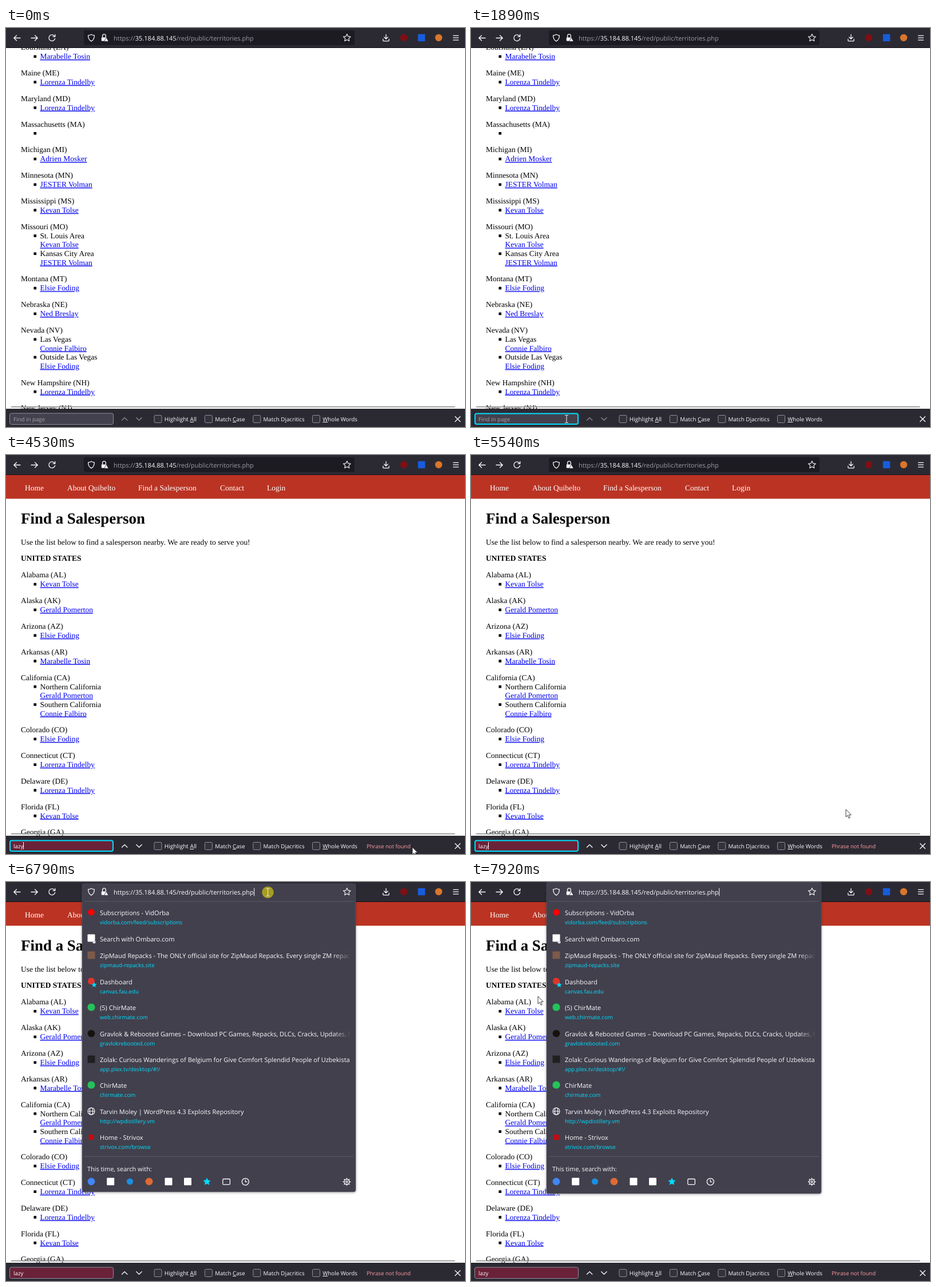
Write an HTML page that moves like this. It is 802x698 px and loops after 8000 ms.

```html
<!DOCTYPE html>
<html lang="en">
<head>
<meta charset="utf-8">
<title>Find a Salesperson</title>
<style>
  html, body { margin: 0; width: 100%; height: 100%; overflow: hidden; background: #fff; }
  svg { display: block; width: 802px; height: 698px; }
  text { white-space: pre; text-rendering: geometricPrecision; }
  .page { font: 13.47px "Liberation Serif", "Times New Roman", serif; }
  .ui { font: 11.05px "Open Sans", "Noto Sans", sans-serif; }
  .link { fill: #00e; text-decoration: underline; }
  .key { text-decoration: underline; }
  .line { fill: none; stroke: #fbfbfe; stroke-width: 1.3; stroke-linecap: round; stroke-linejoin: round; }
</style>
</head>
<body>
<svg id="stage" viewBox="0 0 802 698" xmlns="http://www.w3.org/2000/svg"></svg>
<script>
const LOOP = 8000, STEP = 125.5, LEAD = 5;
const BAR = '#2b2a33', PANEL = '#42414d', LIGHT = '#fbfbfe', DIM = '#9d9ca6', CYAN = '#00ddff';

// Small markup helpers
const esc = s => s.replace(/&/g, '&amp;');
const text = (x, y, s, attrs = '') => `<text x="${x}" y="${y}" ${attrs}>${s}</text>`;
const rect = (x, y, w, h, fill, attrs = '') =>
  `<rect x="${x}" y="${y}" width="${w}" height="${h}" fill="${fill}" ${attrs}/>`;
const disc = (x, y, r, fill, attrs = '') => `<circle cx="${x}" cy="${y}" r="${r}" fill="${fill}" ${attrs}/>`;
const square = (x, y, size, fill) => rect(x - size / 2, y - size / 2, size, size, fill, 'rx="1"');
const line = (d, attrs = '') => `<path class="line" d="${d}" ${attrs}/>`;
const group = (id, body, attrs = '') => `<g id="${id}" ${attrs}>${body}</g>`;

function star(cx, cy, r, attrs) {
  const pts = [];
  for (let i = 0; i < 10; i++) {
    const a = i * Math.PI / 5 - Math.PI / 2, q = i % 2 ? r * 0.48 : r;
    pts.push((cx + q * Math.cos(a)).toFixed(2) + ',' + (cy + q * Math.sin(a)).toFixed(2));
  }
  return `<polygon points="${pts.join(' ')}" stroke-linejoin="round" ${attrs}/>`;
}

// Sales people
const P = {
  eo: 'Marabelle Tosin', bh: 'Lorenza Tindelby', sh: 'Adrien Mosker', hb: 'JESTER Volman',
  db: 'Kevan Tolse', ib: 'Elsie Foding', ks: 'Ned Breslay', st: 'Connie Falbiro', rh: 'Gerald Pomerton'
};

const topStates = [
  ['Alabama (AL)', P.db], ['Alaska (AK)', P.rh], ['Arizona (AZ)', P.ib], ['Arkansas (AR)', P.eo],
  ['California (CA)', ['Northern California', P.rh], ['Southern California', P.st]],
  ['Colorado (CO)', P.ib], ['Connecticut (CT)', P.bh], ['Delaware (DE)', P.bh],
  ['Florida (FL)', P.db], ['Georgia (GA)', P.db]
];
const lowerStates = [
  ['Louisiana (LA)', P.eo], ['Maine (ME)', P.bh], ['Maryland (MD)', P.bh], ['Massachusetts (MA)', ''],
  ['Michigan (MI)', P.sh], ['Minnesota (MN)', P.hb], ['Mississippi (MS)', P.db],
  ['Missouri (MO)', ['St. Louis Area', P.db], ['Kansas City Area', P.hb]],
  ['Montana (MT)', P.ib], ['Nebraska (NE)', P.ks],
  ['Nevada (NV)', ['Las Vegas', P.st], ['Outside Las Vegas', P.ib]],
  ['New Hampshire (NH)', P.bh], ['New Jersey (NJ)', P.bh]
];

function stateList(states, y) {
  let out = '';
  for (const [name, ...areas] of states) {
    out += text(26, y, name);
    let rowY = y + 16;
    for (const area of areas) {
      out += rect(48.5, rowY - 6.5, 4.6, 4.6, '#000');
      if (Array.isArray(area)) {
        out += text(59.5, rowY, area[0]) + text(59.5, rowY + 15.7, area[1], 'class="link"');
        rowY += 31.3;
      } else {
        out += text(59.5, rowY, area, 'class="link"');
      }
    }
    y += Array.isArray(areas[0]) ? 91.6 : 44.8;
  }
  return out;
}

const nav = [[33, 'Home'], [107, 'About Quibelto'], [231, 'Find a Salesperson'], [374, 'Contact'], [456, 'Login']];
const topPage = rect(0, 35, 802, 41.5, '#bb3323')
  + nav.map(([x, s]) => text(x, 62, s, 'fill="#fff"')).join('')
  + text(26, 119.7, 'Find a Salesperson', 'font-size="26.94" font-weight="bold"')
  + text(26, 157, 'Use the list below to find a salesperson nearby. We are ready to serve you!')
  + text(26, 185.4, 'UNITED STATES', 'font-weight="bold"')
  + stateList(topStates, 214.3);

// Browser toolbar
const toolbar = rect(0, 0, 802, 34, BAR) + rect(0, 34, 802, 1, '#0f0e14')
  + rect(136, 4, 473, 26, '#1c1b22', 'rx="3.5"')
  + line('M25 17.5H14M18.5 13l-4.7 4.5 4.7 4.5')
  + line('M44 17.5H55M50.5 13l4.7 4.5-4.7 4.5')
  + line('M85 14.5A5.4 5.4 0 1 0 85.6 18.5M85.8 11.5V15.2H82')
  + line('M664 11.5V19M660.8 16l3.2 3.2 3.2-3.2M658.8 19.5v2.3q0 1 1 1h8.4q1 0 1-1v-2.3')
  + disc(695, 17, 6.2, '#800f14') + square(726, 17, 12.5, '#175ddc') + disc(756, 17, 6.2, '#d9762b')
  + line('M781.5 13.3h9M781.5 17.2h9M781.5 21.1h9');

const addressBar = line('M149 11.2q2.6 1.7 5.3 1.7q.4 7.4-5.3 10.2q-5.7-2.8-5.3-10.2q2.7 0 5.3-1.7z')
  + line('M168.6 16.5V13.8a2.9 2.9 0 0 1 5.8 0V16.5')
  + rect(166.8, 16.4, 8.6, 6.4, LIGHT, 'rx="1"')
  + `<path d="M175.3 16.6l3.8 6.8h-7.6z" fill="${LIGHT}" stroke="${BAR}" stroke-width=".8"/>`
  + star(595.8, 17.3, 6.8, `fill="none" stroke="${LIGHT}" stroke-width="1.1"`)
  + text(188, 22, '<tspan class="dim">https://</tspan>35.184.88.145<tspan class="dim">/red/public/territories.php</tspan>',
    `fill="${LIGHT}"`)
  + group('urlCaret', rect(433.2, 10.5, 1, 14, LIGHT));

// Find bar
const box = x => rect(x, 677.5, 13, 13, '#33323b', 'rx="2" stroke="#8f8f9d"');
const option = (x, label, size = 9.75) => text(x, 688, label, `font-size="${size}" fill="${LIGHT}"`);
const key = c => `<tspan class="key">${c}</tspan>`;
const findBar = rect(0, 666.5, 802, 32, BAR) + rect(0, 666.3, 802, 1, '#15141a')
  + '<rect id="field" rx="3"/>'
  + text(13, 688, '', 'id="query" font-size="9.75"')
  + group('findCaret', rect(0, 677, 1, 13, LIGHT))
  + group('arrows', line('M202.5 686.3l4.7-4.6 4.7 4.6M227.8 681.7l4.7 4.6 4.7-4.6'))
  + [259, 347.4, 431.8, 535.5].map(box).join('')
  + option(276.8, 'Highlight ' + key('A') + 'll', 10.1)
  + option(365.2, 'Match ' + key('C') + 'ase')
  + option(449.5, 'Match D' + key('i') + 'acritics')
  + option(553.3, key('W') + 'hole Words')
  + text(630, 688, 'Phrase not found', 'id="status" font-size="9.55" fill="#ff9aa2"')
  + line('M784.8 679.7l8.8 8.8M793.6 679.7l-8.8 8.8');

// Address suggestions
const globe = (x, y) => `<g fill="none" stroke="${LIGHT}" stroke-width="1.1">`
  + `<circle cx="${x}" cy="${y}" r="6"/><ellipse cx="${x}" cy="${y}" rx="2.7" ry="6"/><path d="M${x - 6} ${y}h12"/></g>`;
const badge = (x, y) => star(x, y, 4.8, `fill="${CYAN}"`);
const suggestions = [
  [54, 'Subscriptions - VidOrba', 'vidorba.com/feed/subscriptions', disc(149, 53, 5.8, '#f00')],
  [99.5, 'Search with Ombaro.com', '', square(149, 98, 13, '#fff') + disc(154, 105, 2.6, '#dcdce2')],
  [129, 'ZipMaud Repacks - The ONLY official site for ZipMaud Repacks. Every single ZM repack installer',
    'zipmaud-repacks.site', square(149, 128, 13, '#7d5a4a')],
  [174.5, 'Dashboard', 'canvas.fau.edu', disc(149, 173.5, 6, '#e0352b') + badge(154, 180)],
  [220, '(5) ChirMate', 'web.chirmate.com', disc(149, 219, 6.6, '#25c15b')],
  [265.5, 'Gravlok & Rebooted Games – Download PC Games, Repacks, DLCs, Cracks, Updates, Free',
    'gravlokrebooted.com', disc(149, 265, 6.3, '#17110f')],
  [311, 'Zolak: Curious Wanderings of Belgium for Give Comfort Splendid People of Uzbekistan',
    'app.plex.tv/desktop/#!/', square(149, 310, 13, '#1f2022')],
  [356, 'ChirMate', 'chirmate.com', disc(149, 355, 6.6, '#25c15b')],
  [401.5, 'Tarvin Moley | WordPress 4.3 Exploits Repository', 'http://wpdistillery.vm', globe(149, 401)],
  [447, 'Home - Strivox', 'strivox.com/browse', square(149, 446.5, 9, '#c9080f')]
];
const suggestionRow = ([y, title, url, icon]) => icon
  + text(164, y + 4, esc(title), `fill="${LIGHT}" clip-path="url(#titles)"`)
  + (url ? text(164, y + 20.2, url, `font-size="9.7" fill="${CYAN}"`) : '');

let teeth = '';
for (let i = 0; i < 8; i++) {
  teeth += `<path class="line" d="M595.5 519.8v-1.6" transform="rotate(${i * 45} 595.5 524.5)"/>`;
}
const engines = disc(149, 524, 6.4, '#4285f4') + square(182.7, 524, 13, '#fff') + disc(216.5, 524, 5.6, '#1b8fe0')
  + disc(250, 524, 6.5, '#de6a34') + square(284, 524, 13, '#fff') + square(317.5, 524, 13, '#fff')
  + star(351, 524.3, 7, `fill="${CYAN}"`)
  + `<rect class="line" x="378.8" y="519.5" width="12.6" height="9.8" rx="1.5"/>`
  + `<circle class="line" cx="418.3" cy="524.3" r="6"/>` + line('M418.3 520.8v3.8h2.8')
  + `<circle class="line" cx="595.5" cy="524.5" r="4.5"/><circle class="line" cx="595.5" cy="524.5" r="1.6"/>` + teeth;

const popup = `<rect id="panel" fill="${PANEL}" stroke="#52515e" stroke-width=".6" rx="3.5" filter="url(#shadow)"/>`
  + rect(136, 33.5, 472, 1, '#5a5965') + rect(136, 479.7, 472, 1, '#5a5965')
  + suggestions.map(suggestionRow).join('')
  + rect(572, 118, 31, 20, 'url(#fade)') + rect(572, 255, 31, 20, 'url(#fade)')
  + text(142, 505.5, 'This time, search with:', `font-size="10.9" fill="${LIGHT}"`) + engines;

const pointer = '<path id="arrow" d="M0 0V13.2L3 10.4L5.2 15.4L7.3 14.5L5.1 9.6H9.3Z" fill="#fff" stroke="#111" stroke-width=".8"/>'
  + group('beam', '<path d="M-3 -6.5H-.8L0 -6L.8 -6.5H3M0 -6V6M-3 6.5H-.8L0 6L.8 6.5H3" fill="none" stroke="#e6e6e6" stroke-width="1.1"/>');

document.getElementById('stage').innerHTML = `<defs>
  <clipPath id="titles"><rect x="160" y="40" width="441" height="440"/></clipPath>
  <linearGradient id="fade"><stop offset="0" stop-color="${PANEL}" stop-opacity="0"/><stop offset="1" stop-color="${PANEL}"/></linearGradient>
  <filter id="shadow" x="-5%" y="-5%" width="110%" height="110%"><feDropShadow dx="0" dy="1" stdDeviation="2" flood-opacity=".35"/></filter>
  </defs>` + rect(0, 0, 802, 698, '#fff')
  + group('lower', stateList(lowerStates, 38.1), 'class="page"')
  + group('top', topPage, 'class="page"')
  + rect(9, 662, 775.5, 1, '#858585') + rect(9, 663, 775.5, .8, '#b8b8b8')
  + group('chrome', toolbar + findBar + group('popup', popup) + addressBar, 'class="ui"')
  + group('cursor', disc(0, 0, 10.3, '#f0e000', 'id="halo" opacity=".58"') + pointer);

const $ = id => document.getElementById(id);
const show = (id, on) => $(id).setAttribute('display', on ? 'inline' : 'none');
const set = (el, attrs) => { for (const k in attrs) el.setAttribute(k, attrs[k]); };
const dims = document.querySelectorAll('.dim');

// Pointer path: [step, x, y]
const path = [
  [3, 784, 686], [5, 560, 664], [7, 300, 650], [9, 172, 682], [10, 167, 684], [25, 167, 684],
  [26, 166, 681], [28, 164, 678], [30, 205, 674], [32, 430, 676], [34, 700, 682], [35, 718, 684], [36, 710, 686],
  [38, 692, 678], [40, 656, 682], [43, 668, 666], [44, 655, 620], [47, 570, 270], [50, 467, 10], [51, 467, 10],
  [52, 461, 15], [53, 459, 18], [54, 457.5, 18], [57, 457.5, 18], [58, 430, 22], [60, 290, 86], [62, 140, 186], [63, 117, 200]
];

function place(n) {
  let i = 0;
  while (i < path.length - 2 && n >= path[i + 1][0]) i++;
  const [a, ax, ay] = path[i], [b, bx, by] = path[i + 1];
  const k = Math.min(1, Math.max(0, (n - a) / (b - a)));
  return [ax + (bx - ax) * k, ay + (by - ay) * k];
}

const blink = (n, start) => Math.floor((n - start) / 4) % 2 === 0;

function draw(t) {
  const n = Math.floor((t - LEAD) / STEP);
  const word = 'lazy'.slice(0, Math.max(0, n - 17));
  const open = n >= 54, focus = n >= 10 && !open, missing = word.length > 2;

  show('lower', !word);
  show('top', word);
  show('status', missing);
  show('popup', open);
  const grow = n > 54 ? 1 : 0;
  set($('panel'), { x: 133 - grow, y: 3 - 3 * grow, width: 478 + 2 * grow, height: 539 + 6 * grow });
  dims.forEach(d => d.setAttribute('fill', open ? LIGHT : DIM));
  show('urlCaret', open && blink(n, 54));

  const inset = focus ? 1 : .5;
  set($('field'), {
    x: 6 + inset, y: 673.5 + inset, width: 182 - 2 * inset, height: 20.5 - 2 * inset,
    fill: missing ? '#6a2238' : PANEL, stroke: focus ? CYAN : '#8f8f9d', 'stroke-width': focus ? 2 : 1
  });
  const query = $('query');
  query.textContent = word || 'Find in page';
  query.setAttribute('fill', word ? LIGHT : '#a3a2ab');
  $('arrows').setAttribute('opacity', word ? 1 : .45);
  const caretOn = n < 18 ? n >= 11 && n < 15 : n < 23 || !blink(n, 23);
  show('findCaret', focus && caretOn);
  $('findCaret').setAttribute('transform', `translate(${[13, 16, 21, 25, 30][word.length]} 0)`);

  const [x, y] = place(n);
  const inField = y > 672 && x > 6 && x < 188, inAddress = y < 30 && x > 185 && x < 585;
  const beam = inField || inAddress;
  show('cursor', n >= 3);
  show('beam', beam);
  show('arrow', !beam);
  show('halo', n === 10 || n === 54 || n === 55);
  $('cursor').setAttribute('transform', `translate(${x.toFixed(1)} ${y.toFixed(1)})`);
}

const began = performance.now();
function tick() {
  draw((performance.now() - began) % LOOP);
  requestAnimationFrame(tick);
}
draw(0);
requestAnimationFrame(tick);
</script>
</body>
</html>
```
